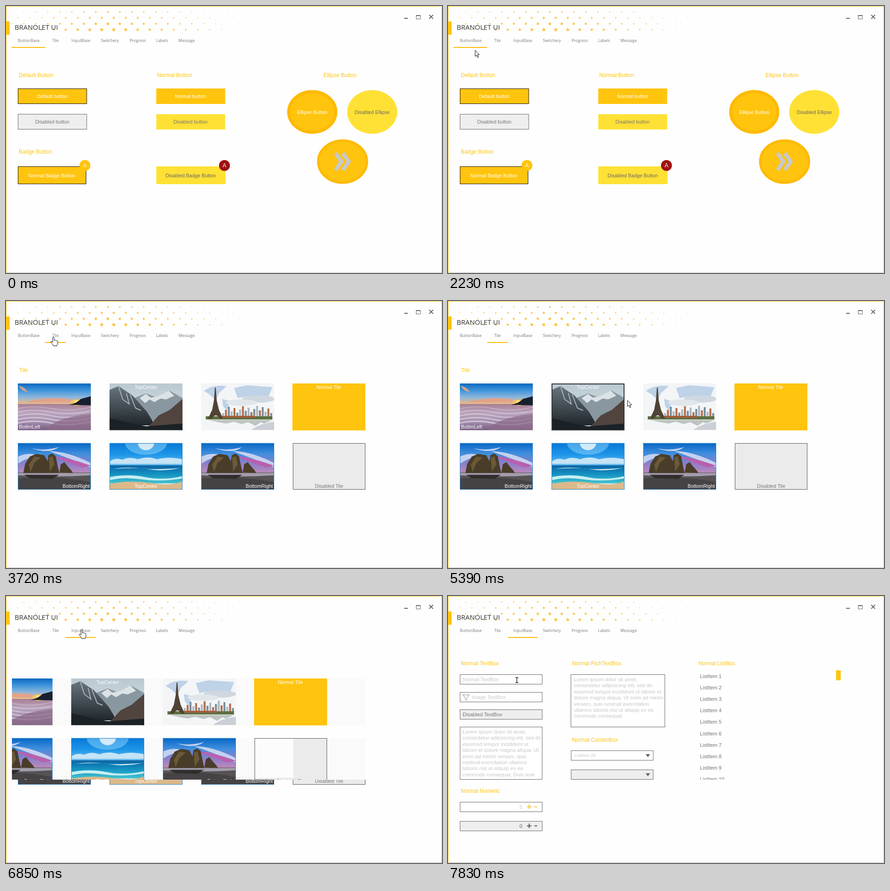
Write an HTML page that moves like this. It is 956 by 586 pixels and loops after 8 s.

```html
<!DOCTYPE html>
<html lang="en">
<head>
<meta charset="utf-8">
<title>Control gallery</title>
<style>
html, body { margin: 0; width: 100%; height: 100%; overflow: hidden; background: #fefefe; }
svg { display: block; }
#stage { width: 956px; height: 586px; font-family: "Liberation Sans", Arial, sans-serif; }
.ui { font-family: "Open Sans", "Noto Sans", sans-serif; }
.sliding { clip-path: url(#view); }
</style>
</head>
<body>
<svg id="stage" viewBox="0 0 956 586" xmlns="http://www.w3.org/2000/svg">
  <defs>
    <clipPath id="view"><rect x="13" y="96" width="930" height="307"/></clipPath>
    <clipPath id="below"><rect x="13" y="403" width="930" height="20"/></clipPath>
    <clipPath id="listBox"><rect x="549" y="160" width="300" height="243"/></clipPath>
  </defs>
  <g id="frame"></g>
  <rect id="line" y="90" height="2" fill="#ffb900"/>
  <g id="ghost" fill="#fafafa">
    <rect x="26" y="181" width="762" height="103"/>
    <rect x="26" y="312" width="762" height="91"/>
  </g>
  <g class="page"><g></g></g>
  <g class="page"><g><g id="tiles"></g><rect id="fade" y="313" height="86" fill="#fcfcfc"/></g></g>
  <g class="page"><g></g></g>
  <use id="strip" href="#tiles" clip-path="url(#below)"/>
  <rect id="hover" fill="none" stroke="#333" stroke-width="2"/>
  <g id="cursor" fill="#fff" stroke="#111" stroke-linejoin="round">
    <path d="M.5 0V13.6L3.5 10.8 5.8 16 7.9 15.1 5.6 10H9.8Z"/>
    <path d="M-1.5 11.5V1.5a1.5 1.5 0 0 1 3 0V7q1.6-1 3 .5 1.6-.8 2.8.7 2-.5 2 1.5V14q-.3 2-1.5 3.5v2H0q-1-2.5-3-5l-2.6-3.4q0-2 2-1.2z"/>
    <path d="M-3-5.5h2.2l.8.8.8-.8H3M0-5V5M-3 5.5h2.2l.8-.8.8.8H3" fill="none" stroke-width="1.3"/>
  </g>
</svg>
<script>
const YELLOW = '#ffc40d', PALE = '#ffe135', GREY = '#666', HINT = '#c6c6c6';
const $ = id => document.getElementById(id);

// Markup helpers
const rect = (x, y, w, h, fill, extra = '') =>
  `<rect x="${x}" y="${y}" width="${w}" height="${h}" fill="${fill}" ${extra}/>`;
const box = (x, y, w, h, fill, stroke = GREY, extra = '') =>
  rect(x + .5, y + .5, w - 1, h - 1, fill, `stroke="${stroke}" ${extra}`);
const text = (x, y, str, fill = '#fff', size = 10.8, anchor = 'start', extra = '') =>
  `<text x="${x}" y="${y}" fill="${fill}" font-size="${size}" text-anchor="${anchor}" ${extra}>${str}</text>`;
const mid = (x, y, str, fill, size) => text(x, y, str, fill, size, 'middle');
const head = (x, y, str) => text(x, y, str, YELLOW, 11.9);
const path = (d, fill, extra = '') => `<path d="${d}" fill="${fill}" ${extra}/>`;
const oval = (x, y, rx, ry, fill, extra = '') =>
  `<ellipse cx="${x}" cy="${y}" rx="${rx}" ry="${ry}" fill="${fill}" ${extra}/>`;
const grad = (id, ...stops) => `<linearGradient id="${id}" x2="0" y2="1">` + stops.map((c, i) =>
  `<stop offset="${i / (stops.length - 1)}" stop-color="${c}"/>`).join('') + '</linearGradient>';
const times = (n, fn) => Array.from({ length: n }, (_, i) => fn(i)).join('');

// Window frame
function dots() {
  let out = '';
  for (let row = 0; row < 5; row++) {
    for (let x = row % 2 ? 12.8 : 25.9; x < 527; x += 26.3) {
      const y = row * 13, r = (1.3 + y * .035) * (1 - Math.abs(x - 230) / 340);
      const s = Math.max(.65, r);
      if (row || r > 1) out += rect(-s, -s, 2 * s, 2 * s, '#fcc84c',
        `rx="${s * .45}" transform="translate(${x} ${y}) rotate(15)"`);
    }
  }
  return out;
}
const tabs = [['ButtonBase', 26], ['Tile', 101.5], ['InputBase', 143.5], ['Switchery', 208],
  ['Progress', 271], ['Labels', 329], ['Message', 378]];
$('frame').innerHTML = rect(0, 0, 956, 586, '#fefefe') + dots()
  + rect(955, 0, 1, 586, '#bfbfbf') + rect(0, 585, 956, 1, '#bfbfbf')
  + rect(0, 0, 956, 1, YELLOW) + rect(0, 0, 1, 586, YELLOW) + rect(0, 34, 8, 29, YELLOW)
  + text(19, 52, 'BRANOLET UI', '#333', 15, 'start', 'class="ui"')
  + tabs.map(([s, x]) => text(x, 79, s, '#777', 8.8, 'start', 'class="ui"')).join('')
  + rect(873, 26, 8, 2, GREY) + box(899, 20, 10, 9, 'none') + rect(899, 20, 10, 2, GREY)
  + path('M928 19.5l8.5 8.5m0-8.5l-8.5 8.5', 'none', `stroke="${GREY}" stroke-width="1.8"`);

// Buttons
const chevron = x => path(`M${x} 323l13 18.5-13 18.5`, 'none', 'stroke="#c9c9c9" stroke-width="8.5"');
const badge = (x, fill) => oval(x, 350, 12, 12, fill) + mid(x, 354, 'A', '#fff', 12);
const ring = width => `stroke="#ffb900" stroke-width="${width}"`;
const buttons = head(28, 155.5, 'Default Button') + head(331.5, 155.5, 'Normal Button')
  + head(696, 155.5, 'Ellipse Button') + head(28, 323.5, 'Badge Button')
  + box(26, 181, 151.5, 34, YELLOW, '#111', 'id="push"') + mid(101.5, 202, 'Default button')
  + box(26, 237, 151.5, 34, '#eee') + mid(101.5, 258, 'Disabled button', '#777')
  + rect(329.5, 181, 151, 34, YELLOW) + mid(404.5, 201.5, 'Normal button')
  + rect(329.5, 237.5, 151, 33.5, PALE) + mid(404.5, 257.5, 'Disabled button', '#777')
  + box(26, 352, 150, 39, YELLOW, '#111') + mid(100.5, 375.5, 'Normal Badge Button')
  + rect(329.5, 352, 152, 39, PALE) + mid(405, 375.5, 'Disabled Badge Button', GREY)
  + badge(173, YELLOW) + badge(479, '#a01212')
  + oval(671.5, 232.5, 51.75, 44.75, YELLOW, ring(6.5)) + mid(671.5, 237, 'Ellipse Button')
  + oval(803, 232.5, 55, 48, PALE) + mid(803, 237, 'Disabled Ellipse', GREY)
  + oval(738, 341.5, 53.5, 46.3, YELLOW, ring(5)) + chevron(722.5) + chevron(738.5);

// Tiles
const photo = (x, y, art) =>
  `<svg x="${x}" y="${y}" width="160" height="102.5" overflow="hidden">${art}</svg>`;
const paints = grad('dusk', '#0b69bf', '#3f95dc', '#8fb6dc', '#f5b878')
  + grad('shore', '#a77f96', '#b9a5bd', '#a58fb0', '#755c80')
  + grad('rockSky', '#0666c4', '#3f8ede', '#8f7fc8', '#c88cb8')
  + grad('sky', '#0678d8', '#1e96e8', '#78c4f0') + grad('sea', '#0c64a4', '#1493c4', '#46c4d0')
  + grad('haze', '#b9c8d0', '#e0e8ea') + grad('slope', '#68757c', '#20272c');
const sunset = rect(0, 0, 160, 46, 'url(#dusk)') + rect(0, 45, 160, 58, 'url(#shore)')
  + path('M2 5q12 2 20 14-14-2-20-14z', '#d9a284') + path('M30 38q40-9 85-3v6H20z', '#e5a288')
  + oval(129, 42, 13, 7, '#ffc25a') + oval(129, 42, 5, 5, '#fff0a0')
  + path('M112 47q18-4 26-13l22-6v20z', '#182030')
  + times(5, i => path(`M0 ${55 + i * 8}q35-8 74 0t86-3`, 'none',
    `stroke="#eee5ee" stroke-width="${1 + i * .5}" opacity=".6"`))
  + path('M62 102q14-25 98-36v36z', '#8d6b88', 'opacity=".75"');
const mountain = rect(0, 0, 160, 103, 'url(#haze)')
  + path('M0 38l28-18 20 14 32-12 22 8 30-14 28 16v50H0z', '#8997a0')
  + path('M66 32l14-9 10 8 16-3 24-12 12 11-18 8-12-2-14 8-10-6-10 8z', '#dce3e6')
  + path('M0 14l20-8 30 20 32 36 18 30H0z', 'url(#slope)')
  + path('M20 7l9 28 14 10-6-24M45 24l12 30 12 5', 'none', 'stroke="#a9b4ba" stroke-width="2"')
  + path('M160 34l-28 24-24 12-22 24 74 9z', '#51443f') + path('M0 76l40 10 40 8 80-6v16H0z', '#1b2226');
const city = rect(0, 0, 160, 103, '#f3f5f7')
  + path('M6 16q22-15 50-10l-16 14-8 16-14-12zM46 34l18 5-8 20-8-9zM72 10l28-6 56 4-8 20-20 3-8 11-18-14-22 4z', '#bed2e8')
  + oval(125, 34, 36, 8, '#cfd8e0') + oval(88, 42, 34, 7, '#e0e6ea')
  + times(18, i => rect(46 + i * 6.2, 74 - (9 + i * 7 % 17), 4.2, 9 + i * 7 % 17,
    ['#aab8c0', '#b76b4c', '#788e9c'][i % 3]))
  + rect(10, 72, 146, 7, '#5d7040') + rect(46, 71, 72, 4, '#a65b3c')
  + path('M30 9l2 0 2 28 5 21 9 19h-8q-8-14-16 0h-9l9-19 4-21z', '#514334')
  + path('M14 80h142l-18 8-7-3-12 8-16-8-14 4-18-5-16 4-18-3z', '#a9b1aa', 'opacity=".7"')
  + path('M110 102q18-14 50-18v18z', '#cbd0d6');
const rocks = rect(0, 0, 160, 70, 'url(#rockSky)')
  + path('M0 30q26-12 50 0-28 0-50 16zM68 18q40 0 92 26v10q-40-18-92-36zM30 12q30 6 60-3-20 16-60 3z', '#c3d1ef')
  + path('M70 28q35 2 90 22l-18 4q-30-10-72-26z', '#b960ae')
  + rect(0, 65, 160, 38, '#575355') + path('M0 66h160v5q-80 5-160 0z', '#a39eac')
  + path('M0 78q80-8 160 8v17H0z', '#464345')
  + path('M12 66l4-20 10-16 14-6 18 3 7 13 2-13 8-4 8 6 4 20 4 17zM91 65l3-18 8-5 6 8 9 10 4 6z', '#493d2a')
  + path('M24 48l12-18 14 2-14 12-8 20zM68 32l8-3 4 18-10 16z', '#6b5938')
  + path('M14 70h76l-14 9-50-2z', '#302d2c');
const beach = rect(0, 0, 160, 52, 'url(#sky)') + oval(80, 0, 46, 26, '#9adcff', 'opacity=".45"')
  + oval(80, 0, 18, 16, '#fff', 'opacity=".75"')
  + path('M0 41q14-10 28-4 16-8 34-1 22-8 42 0 26-7 56 0v10H0z', '#c5e4f6')
  + rect(0, 49, 160, 40, 'url(#sea)')
  + path('M8 57q30-5 60-1t88-1q-40 8-70 3t-78-1z', '#e7f6f8')
  + path('M0 75q40-8 78 0t82-2v5q-50 8-90 2t-70 2z', '#c7eef0')
  + path('M0 90q40-9 90-2t70-4v19H0z', '#dcb98b');
const frames = [[26, 312], [227, 312], [428, 312]].map(([x, y]) => box(x, y, 160, 102, 'none', '#2585c8'));
$('tiles').innerHTML = '<defs>' + paints + '</defs>' + head(29, 155.5, 'Tile')
  + photo(26, 181, sunset) + text(28.5, 279.5, 'BottmLeft')
  + photo(227, 181, mountain) + mid(307, 193, 'TopCenter')
  + photo(428, 181, city) + rect(628, 181, 160, 103, YELLOW) + mid(707.5, 193, 'Normal Tile')
  + photo(26, 311.5, rocks) + photo(227, 311.5, beach) + photo(428, 311.5, rocks) + frames.join('')
  + text(183.5, 410, 'BottomRight', '#fff', 10.8, 'end') + mid(307, 410, 'TopCenter')
  + text(585, 410, 'BottomRight', '#fff', 10.8, 'end')
  + box(629, 312, 159, 102, '#ebebeb', '#555') + mid(708.5, 410, 'Disabled Tile', '#777');

// Inputs
const field = (x, y, str = '', off = false) => box(x, y, 181, 22, off ? '#eee' : '#fff')
  + text(x + 6, y + 14.5, str, off ? '#777' : HINT, 11.3);
const lines = (x, y, str) => str.split('|').map((s, i) => text(x, y + i * 13.4, s, HINT, 11.3)).join('');
const spin = (y, value, off, ink) => field(26, y, '', off)
  + text(163, y + 14.5, value, off ? GREY : HINT, 11.3, 'end')
  + path(`M173 ${y + 10.5}h10m-5-5v10M189.5 ${y + 10.5}h6`, 'none', `stroke="${ink}" stroke-width="2"`);
const combo = (y, str, off) => field(269.5, y, '', off) + text(277, y + 14, str, HINT, 9.5)
  + path(`M433.5 ${y + 8}h9.5l-4.7 7z`, GREY);
const lorem = 'Lorem ipsum dolor sit amet,|consectetur adipisicing elit, sed do|';
const inputs = head(28, 152, 'Normal TextBox') + head(272, 152, 'Normal RichTextBox')
  + head(549, 152, 'Normal ListBox') + head(272, 319.5, 'Normal ComboBox') + head(28, 432, 'Normal Numeric')
  + field(26, 172, 'Normal TextBox') + field(26, 211) + text(52, 225.5, 'Image TextBox', HINT, 11.3)
  + path('M32.5 217h14l-5.3 6.5v5.5l-3.4-2v-3.5z', 'none', 'stroke="#b5b5b5" stroke-width="1.4"')
  + field(26, 249, 'Disabled TextBox', true)
  + box(26, 287, 181, 116, '#fff') + lines(32, 302, lorem + 'eiusmod tempor incididunt ut|labore et dolore magna aliqua. Ut|'
    + 'enim ad minim veniam, quis|nostrud exercitation ullamco|laboris nisi ut aliquip ex ea|commodo consequat. Duis aute')
  + box(269, 172, 207, 116, '#fff') + lines(276, 187, lorem + 'eiusmod tempor incididunt ut labore et|'
    + 'dolore magna aliqua. Ut enim ad minim|veniam, quis nostrud exercitation|ullamco laboris nisi ut aliquip ex ea|commodo consequat.')
  + combo(339, 'ListItem 25', false) + combo(381, '', true)
  + spin(452, 5, false, YELLOW) + spin(494, 0, true, '#555')
  + '<g clip-path="url(#listBox)">'
  + times(10, i => text(552.5, 179.5 + i * 25.2, 'ListItem ' + (i + 1), '#707070', 10.9)) + '</g>'
  + rect(851, 163, 10, 22, YELLOW);

const pages = [...document.querySelectorAll('.page')];
pages[0].firstElementChild.innerHTML = buttons;
pages[2].firstElementChild.innerHTML = inputs;

// Bursts of pointer motion: start, end, number of steps
const bursts = [[240, 980, 11], [1070, 1850, 12], [1930, 1990, 2], [2150, 2670, 8], [2900, 2970, 2],
  [3200, 3200, 1], [4790, 5520, 11], [5600, 6310, 11], [6480, 6800, 5], [7460, 7830, 6]];
// Pointer path: time, x, y
const route = [[240, 823, 574], [500, 755, 545], [800, 640, 505], [980, 587, 491],
  [1070, 570, 478], [1300, 420, 390], [1600, 185, 250], [1780, 95, 185], [1850, 75, 156],
  [1930, 64, 128], [1990, 56, 112], [2150, 57, 104], [2224, 59, 97], [2450, 84, 86], [2670, 112, 72],
  [2900, 113, 72], [2970, 113, 73], [3200, 104, 79],
  [4790, 107, 88], [4940, 130, 150], [5080, 168, 200], [5230, 290, 222], [5374, 393, 218], [5520, 470, 226],
  [5600, 505, 248], [5740, 500, 325], [5890, 400, 350], [6030, 270, 340], [6160, 165, 310], [6310, 140, 133],
  [6480, 150, 108], [6640, 162, 84], [6800, 166, 74],
  [7460, 165, 82], [7600, 160, 120], [7750, 153, 170], [7830, 151, 184.5]];
// Hovered tiles: start, end, column, row
const hovers = [[4980, 5160, 0, 0], [5160, 5450, 1, 0], [5450, 5670, 2, 0], [5670, 5900, 2, 1],
  [5900, 6100, 1, 1], [6100, 6170, 0, 1], [6170, 6310, 0, 0]];

function snap(t) {
  const hit = bursts.filter(b => b[0] <= t).pop();
  if (!hit) return 0;
  const [from, to, n] = hit, step = (to - from) / (n - 1) || 1;
  return from + Math.min(n - 1, Math.floor((t - from) / step + .001)) * step;
}
function pointer(t) {
  const i = route.findIndex(p => p[0] >= t - .01);
  const [t1, x1, y1] = route[i], [t0, x0, y0] = route[Math.max(0, i - 1)];
  const k = t1 > t0 ? (t - t0) / (t1 - t0) : 1;
  return [x0 + (x1 - x0) * k, y0 + (y1 - y0) * k];
}
const show = (el, on) => { el.style.display = on ? '' : 'none'; };
const set = (el, attrs) => { for (const k in attrs) el.setAttribute(k, attrs[k]); };
const slide = (t, start, lag) => Math.max(0, Math.floor((t - start) / 70) * 210 - lag);

function render(t) {
  const page = t < 3720 ? 0 : t < 7150 ? 1 : 2;
  const shift = page === 0 ? slide(t, 3340, 0) : page === 1 ? slide(t, 6780, 126) : 0;
  pages.forEach((p, i) => show(p, i === page));
  pages[page].classList.toggle('sliding', shift > 0);
  pages[page].firstElementChild.setAttribute('transform', `translate(${-shift} 0)`);
  const ghosting = page === 1 && shift > 0;
  show($('strip'), ghosting);
  show($('ghost'), ghosting);
  set($('fade'), { x: 630, width: Math.min(shift, 157) });

  const [x, w] = t < 3350 ? [12, 74] : t < 6780 ? [86, 45] : [131, 66];
  set($('line'), { x, width: w });
  $('push').setAttribute('fill', t >= 1700 && t < 1850 ? '#ffd24a' : YELLOW);

  const over = hovers.find(h => t >= h[0] && t < h[1]);
  show($('hover'), over);
  if (over) set($('hover'), { x: 228 + (over[2] - 1) * 200.5, y: 182 + over[3] * 130.5, width: 158, height: 101 });

  const q = snap(t);
  show($('cursor'), q);
  if (!q) return;
  const [px, py] = pointer(q);
  const kind = q > 7700 && py > 171 ? 2 : py < 91 ? 1 : 0;
  [...$('cursor').children].forEach((c, i) => show(c, i === kind));
  $('cursor').setAttribute('transform', `translate(${px} ${py})`);
}

const start = performance.now();
function tick() {
  render((performance.now() - start) % 8000);
  requestAnimationFrame(tick);
}
tick();
</script>
</body>
</html>
```
